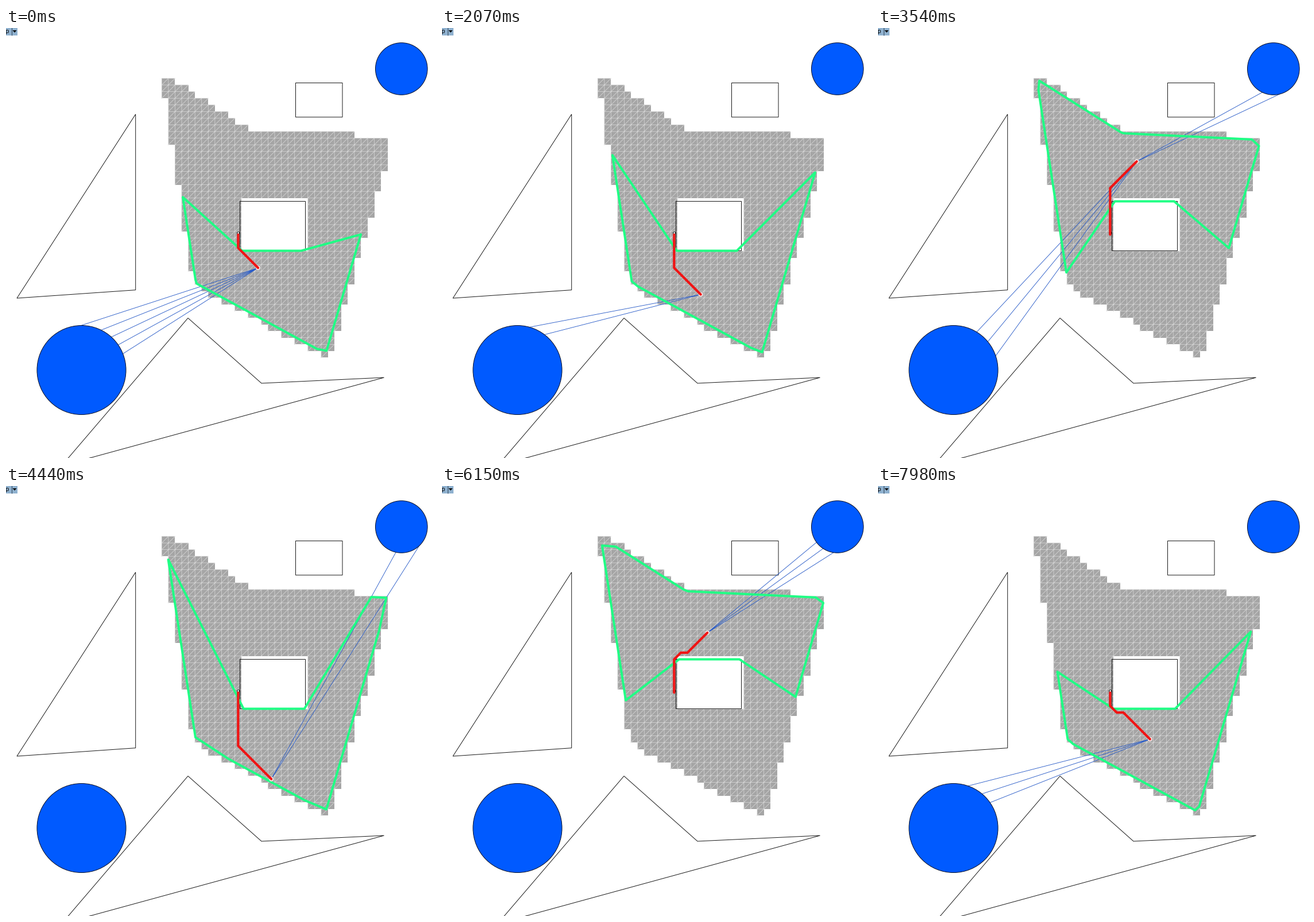
Recreate the animation shown at these times as a matplotlib script. Size 749 by 748 pixels, loop 8 s.

```python
import numpy as np
import matplotlib.pyplot as plt
from matplotlib.animation import FuncAnimation
from matplotlib.collections import PolyCollection
from matplotlib.patches import Circle, Polygon, Rectangle

W, H, DPI = 749, 748, 64
PX = 72 / DPI                      # one pixel in points
LOOP, INTERVAL = 8000, 25
CELL, X0, Y0 = 11.57, 271.3, 87.5
COLS, ROWS = 34, 42
HOLE_COLS, HOLE_ROWS = range(12, 22), range(18, 26)
START = (11, 23)

ROOM = [(276.6, 89), (425.5, 183), (666.7, 194.6), (556.8, 566.5), (331, 444)]
TRIANGLE = [(19, 470), (225.7, 455.7), (225.7, 150)]
WEDGE = [(108, 748.5), (317, 504.5), (445, 618), (658.5, 608), (144, 748.5)]
CIRCLES = [((131.5, 595), 77.5), ((688.8, 71), 45.3)]


def box(x0, y0, x1, y1):
    return [(x0, y0), (x1, y0), (x1, y1), (x0, y1)]


BLOCK = box(407.5, 301.5, 521.5, 387.5)
SMALL = box(504.5, 95.5, 586, 155)


def center(col, row):
    return X0 + (col + .5) * CELL, Y0 + (row + .5) * CELL


def edges(*polys):
    return np.array([(p, q) for poly in polys
                     for p, q in zip(poly, poly[1:] + poly[:1])], float)


def on_floor(c, r):
    """True for cells between the sloping walls and outside the block."""
    left = max(.1544 * r - .45, 15.9 + 1.8 * (r - 37))
    right = 33 - (r - 13.24) / 3.42
    top = min((c - 1.47) / 1.55, 8 + .043 * (c - 28.5))
    in_hole = c in HOLE_COLS and r in HOLE_ROWS
    return left <= c <= right and r >= top and not in_hole


cells = [(c, r) for c in range(COLS) for r in reversed(range(ROWS)) if on_floor(c, r)]

# The probe climbs each column from the bottom, one cell at a time
ROUTE = cells[cells.index((14, 28)):]
TIMES = [0, 2070, 2190, 3540, 7980]
STEPS = [0, 17, 17.5, 29, 63]

ANGLES = np.radians(3.6) * np.arange(100)
DIRS = np.column_stack([np.cos(ANGLES), np.sin(ANGLES)])
SIGHT = edges(ROOM, BLOCK)
BLOCKERS = edges(BLOCK, TRIANGLE, WEDGE, box(504.5, 95.5, 586, 149))


def cross(a, b):
    return a[..., 0] * b[..., 1] - a[..., 1] * b[..., 0]


def cast(p, segs):
    """Distance along every ray to the nearest segment."""
    rel = segs[:, 0] - p
    vec = segs[:, 1] - segs[:, 0]
    d = DIRS[:, None]
    den = cross(d, vec[None])
    den = np.where(np.abs(den) < 1e-9, 1e-9, den)
    t = cross(rel, vec)[None] / den
    u = cross(rel[None], d) / den
    return np.where((u >= 0) & (u <= 1) & (t > 0), t, np.inf).min(axis=1)


def sun_rays(p):
    """Unblocked rays that reach a circle, as NaN separated segments."""
    limit = cast(p, BLOCKERS)
    out = [(np.nan, np.nan)]
    for mid, rad in CIRCLES:
        rel = np.array(mid) - p
        along = DIRS @ rel
        half = rad ** 2 - (rel @ rel - along ** 2)
        dist = along - np.sqrt(np.maximum(half, 0))
        seen = (half > 0) & (along > 0) & (dist < limit)
        for end in p + DIRS[seen] * dist[seen, None]:
            if end[1] < 595:       # only the upper half of the big circle shines
                out += [p, end, (np.nan, np.nan)]
    return np.array(out)


def walk(col, row):
    """Shortest eight-way path around the block."""
    c0, r0 = START
    down = row > r0
    sign = 1 if down else -1
    corner = HOLE_ROWS[-1] if down else HOLE_ROWS[0]
    turn = row - sign * (col - c0)
    if (turn - corner) * sign >= 0:
        path = [START, (c0, turn), (col, row)]
    else:
        lane = corner + sign
        path = [START, (c0, corner), (c0 + 1, lane),
                (col - abs(row - lane), lane), (col, row)]
    return np.array([center(*p) for p in path])


fig = plt.figure(figsize=(W / DPI, H / DPI), dpi=DPI, facecolor="white")
ax = fig.add_axes([0, 0, 1, 1])
ax.set_xlim(0, W)
ax.set_ylim(H, 0)
ax.axis("off")


def line(color, width, z, **kw):
    return ax.plot([], [], color=color, lw=width * PX, zorder=z, **kw)[0]


# Meshed floor
squares, mesh = [], []
for c, r in cells:
    x, y = X0 + c * CELL, Y0 + r * CELL
    sq = box(x, y, x + CELL, y + CELL)
    squares.append(sq)
    mesh += [sq[3], sq[0], sq[1], sq[3], (np.nan, np.nan)]
ax.add_collection(PolyCollection(squares, facecolors="#a5a5a5", edgecolors="none",
                                 antialiaseds=False, zorder=1))
line("#d6d6d6", .8, 1.5).set_data(*np.array(mesh).T)

# Obstacles and light sources
for shape in (TRIANGLE, WEDGE, BLOCK, SMALL):
    ax.add_patch(Polygon(shape, fill=False, ec="#1a1a1a", lw=PX, snap=False, zorder=2))
for mid, rad in CIRCLES:
    ax.add_patch(Circle(mid, rad, fc="#005aff", ec="#0a1226", lw=PX, zorder=3.5))

# Corner of the viewport tab
ax.add_patch(Rectangle((-2, -2), 21.5, 15, fc="#8fb1cf", ec="none", zorder=8))
ax.plot([10.5, 10.5], [0, 13], color="#33475a", lw=PX, snap=False, zorder=9)
ax.add_patch(Polygon([(11.5, 4), (18.5, 4), (15, 8)], fc="black", ec="none", zorder=9))
ax.text(-2, 9, "p", fontsize=11 * PX, family="Liberation Sans", color="black",
        va="baseline", zorder=9)

sx, sy = center(*START)
ax.add_patch(Circle((sx + .4, sy - 2.8), 2, fc="white", ec="black", lw=.9 * PX, zorder=5))

rays = line("#2a5cc8", .9, 3)
view = line("#20ff85", 4, 4, solid_joinstyle="round", solid_capstyle="round")
ring = ax.add_patch(Circle((0, 0), 4, fc="#f4e4e4", ec="none", zorder=5))
path = line("#f01414", 4.2, 6, solid_joinstyle="round", solid_capstyle="round")


def draw(i):
    step = int(np.interp(i * INTERVAL, TIMES, STEPS) + .2)
    cell = ROUTE[step]
    p = np.array(center(*cell))
    outline = p + DIRS * cast(p, SIGHT)[:, None]
    view.set_data(*np.vstack([outline, outline[:1]]).T)
    rays.set_data(*sun_rays(p).T)
    path.set_data(*walk(*cell).T)
    ring.center = p
    return rays, view, ring, path


anim = FuncAnimation(fig, draw, frames=LOOP // INTERVAL, interval=INTERVAL,
                     init_func=lambda: draw(0), repeat=True, repeat_delay=0)
plt.show()
```
